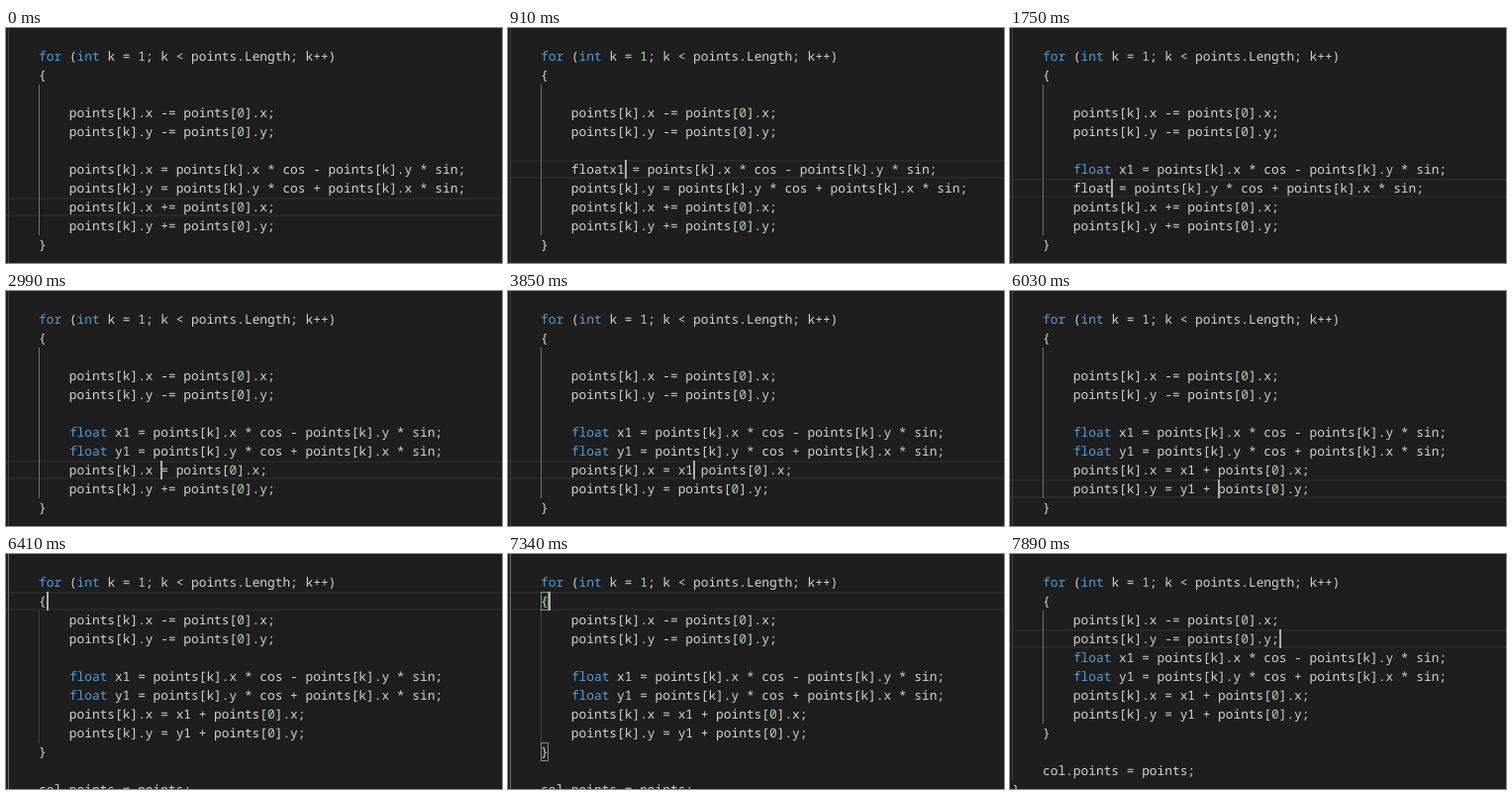
Recreate the animation shown at these times as an HTML page. Size 501 by 237 pixels, loop 8000 ms.

```html
<!DOCTYPE html>
<html lang="en">
<head>
<meta charset="utf-8">
<title>Code edit</title>
<style>
  html, body { margin: 0; width: 100%; height: 100%; overflow: hidden; background: #1e1e1e; }
  #stage { position: relative; width: 501px; height: 237px; overflow: hidden; background: #1e1e1e; }
  #stage div { position: absolute; box-sizing: border-box; }
  #stage .line {
    left: 2.3px; height: 19px; white-space: pre; color: #d4d4d4;
    font: 12.83px/19px "Noto Sans Mono", "DejaVu Sans Mono", monospace;
    font-variant-ligatures: none; text-rendering: geometricPrecision;
  }
  .key { color: #569cd6; }
  .num { color: #b5cea8; }
  .row { left: 0; width: 501px; height: 19px; border: solid #282828; border-width: 2px 0; }
  .guide { width: 1px; background: #404040; }
  .guide.active { background: #707070; }
  .match { width: 8px; height: 19px; border: 1px solid #888; background: rgba(0, 100, 0, .1); }
  .caret { width: 2px; height: 19px; background: #aeafad; }
</style>
</head>
<body>
<div id="stage"></div>
<script>
(() => {
  const LOOP = 8000, ROW = 19, CHAR = 12.83 * 0.6, LEFT = 2.3;
  const stage = document.getElementById('stage');

  const sumX = ' = points[k].x * cos - points[k].y * sin;';
  const sumY = ' = points[k].y * cos + points[k].x * sin;';
  const body = s => ' '.repeat(8) + s;

  const start = {
    lines: [
      '    for (int k = 1; k < points.Length; k++)',
      '    {',
      '',
      body('points[k].x -= points[0].x;'),
      body('points[k].y -= points[0].y;'),
      '',
      body('points[k].x' + sumX),
      body('points[k].y' + sumY),
      body('points[k].x += points[0].x;'),
      body('points[k].y += points[0].y;'),
      '    }',
      '',
      '    col.points = points;',
      '}'
    ],
    row: 8, col: 0, on: false, guide: 'inner', plain: -1, match: false
  };

  // time, changed state; set = [row, text], cut = row to remove
  const edits = [
    [0, {}],
    [500, { guide: '' }],
    [910, { guide: 'inner', set: [6, 'floatx1' + sumX], row: 6, col: 15, on: true }],
    [1290, { set: [6, 'float x1' + sumX], col: 14, plain: 6 }],
    [1380, { plain: -1 }],
    [1750, { set: [7, 'float' + sumY], row: 7, col: 13, plain: 7 }],
    [2530, { set: [7, 'float y1' + sumY], col: 16, plain: -1 }],
    [2990, { set: [8, 'points[k].x = points[0].x;'], row: 8, col: 20 }],
    [3460, { set: [9, 'points[k].y = points[0].y;'], row: 9, col: 20 }],
    [3850, { set: [8, 'points[k].x = x1 points[0].x;'], row: 8, col: 24 }],
    [4700, { on: false }],
    [4870, { set: [8, 'points[k].x = x1 + points[0].x;'], col: 26, on: true }],
    [5250, { set: [9, 'points[k].y = y1points[0].y;'], row: 9, col: 24 }],
    [5650, { set: [9, 'points[k].y = y1 +points[0].y;'], col: 26 }],
    [6030, { set: [9, 'points[k].y = y1 + points[0].y;'], col: 27 }],
    [6410, { cut: 2, row: 1, col: 5, guide: 'outer' }],
    [6500, { match: true }],
    [6880, { on: false }],
    [7340, { on: true }],
    [7890, { cut: 4, row: 3, col: 35, guide: 'inner', match: false }]
  ];

  let last = start;
  const steps = edits.map(([time, { set, cut, ...rest }]) => {
    const lines = last.lines.slice();
    if (set) lines[set[0]] = body(set[1]);
    if (cut !== undefined) lines.splice(cut, 1);
    last = { ...last, ...rest, lines };
    return { time, state: last };
  });

  const rowY = row => (row + 1) * ROW;
  const colX = col => Math.round(LEFT + col * CHAR);

  function box(cls, place, html = '') {
    const css = Object.entries(place).map(([k, v]) => `${k}:${v}px`).join(';');
    return `<div class="${cls}" style="${css}">${html}</div>`;
  }

  function color(text, plain) {
    const safe = text.replace(/</g, '&lt;');
    if (plain) return safe;
    return safe.replace(/\b(?:for|int|float)\b|\b\d+\b/g, w =>
      `<span class="${/\d/.test(w) ? 'num' : 'key'}">${w}</span>`);
  }

  function guide(col, from, to, active) {
    return box(active ? 'guide active' : 'guide', { left: colX(col), top: from, height: to - from });
  }

  function draw(s) {
    const close = s.lines.indexOf('    }');
    let html = box('row', { top: rowY(s.row) });
    html += guide(0, 0, rowY(s.lines.length - 1), s.guide === 'outer');
    html += guide(4, rowY(2), rowY(close), s.guide === 'inner');
    if (s.match) for (const r of [1, close]) html += box('match', { left: colX(4), top: rowY(r) });
    s.lines.forEach((text, r) => { html += box('line', { top: rowY(r) }, color(text, r === s.plain)); });
    if (s.on) html += box('caret', { left: colX(s.col), top: rowY(s.row) });
    stage.innerHTML = html;
  }

  let shown = null;
  const begin = performance.now();
  function tick() {
    const t = (performance.now() - begin) % LOOP;
    const step = steps.filter(e => e.time <= t).pop();
    if (step !== shown) {
      shown = step;
      draw(step.state);
    }
    requestAnimationFrame(tick);
  }
  tick();
})();
</script>
</body>
</html>
```
